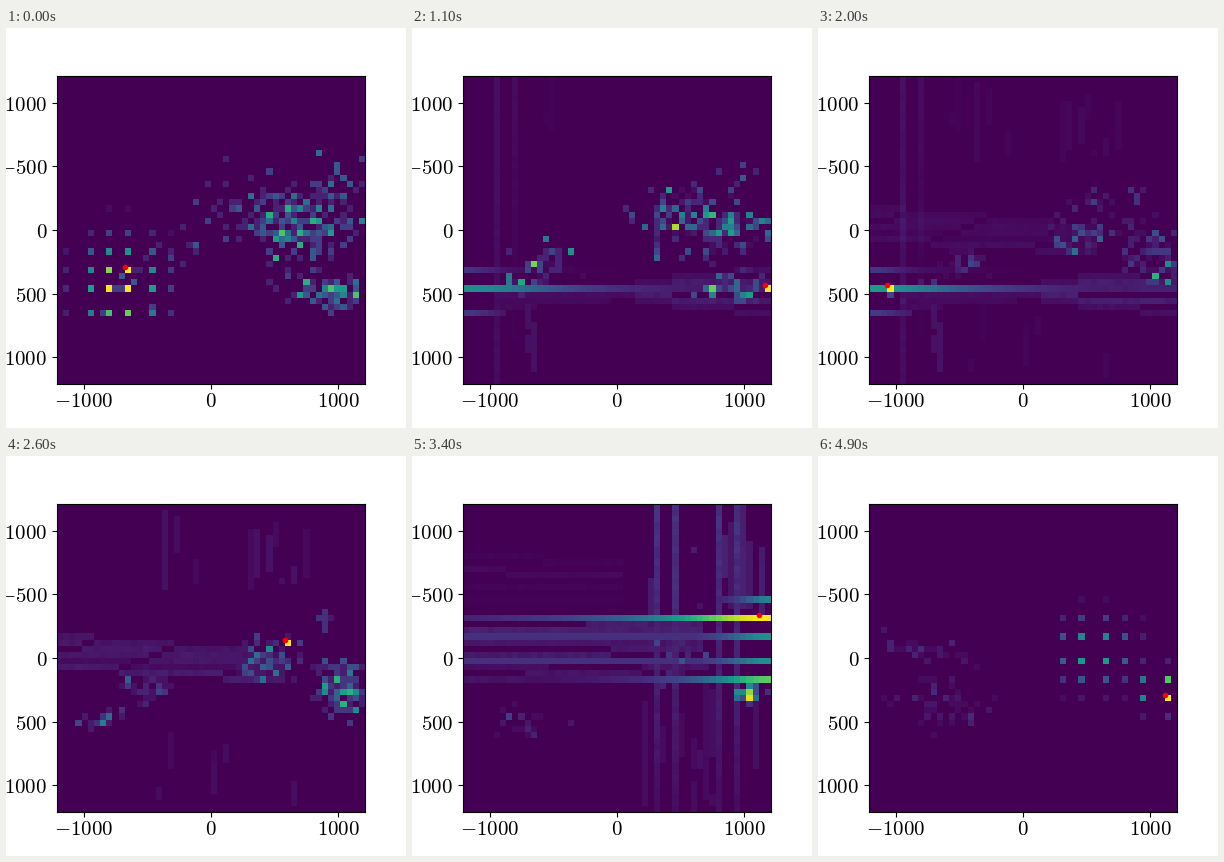
Write a matplotlib script that moves like this. It is 400 px wide and 400 px high and loops after 5 s.

```python
import numpy as np
import matplotlib.pyplot as plt
from matplotlib.animation import FuncAnimation

plt.rcParams["mathtext.fontset"] = "cm"

N = 50
HALF = 1212.5
CELL = 2 * HALF / N
FRAMES, INTERVAL = 50, 100
GRID_COLS = np.array([1, 5, 8, 11, 15, 18])
GRID_ROWS = np.array([11, 15, 18, 21, 25, 28, 31, 34, 38])


class Scene:
    """A histogram of isolated hits (cells) and smeared paths (trails)."""

    def __init__(self, seed, peak):
        self.rng = np.random.default_rng(seed)
        self.peak = peak
        self.cells = np.zeros((N, N))
        self.trails = np.zeros((N, N))

    def cloud(self, n, col, row, sc, sr, step=0.09, tilt=0.0):
        """Gaussian scatter of hits, each a small random multiple of step."""
        dc = self.rng.normal(0, sc, n)
        c = np.rint(col + dc).astype(int)
        r = np.rint(row + tilt * dc + self.rng.normal(0, sr, n)).astype(int)
        ok = (c >= 0) & (c < N) & (r >= 0) & (r < N)
        hits = np.zeros((N, N))
        np.add.at(hits, (r[ok], c[ok]), step * self.rng.geometric(0.65, ok.sum()))
        self.cells = np.maximum(self.cells, np.minimum(hits, 8 * step))
        return self

    def grid(self, cols, col, row, sc, sr, amp):
        """Lattice of hits under a Gaussian envelope."""
        rows, cols = np.meshgrid(GRID_ROWS, cols, indexing="ij")
        v = amp * np.exp(-((cols - col) / sc) ** 2 - ((rows - row) / sr) ** 2)
        v[v < 0.03] = 0
        self.cells[rows, cols] = np.maximum(self.cells[rows, cols], v)
        return self

    def beam(self, row, c0, c1, v, reach, floor=0.0):
        """Horizontal streak, brightest at c0 and falling off towards c1."""
        c = np.arange(min(c0, c1), max(c0, c1) + 1)
        fall = np.maximum(v / (1 + ((c - c0) / reach) ** 2), floor)
        self.trails[row, c] = np.maximum(self.trails[row, c], fall)
        return self

    def fan(self, n, start, end, v):
        """Faint lines between two vertical spans, each (col, top, bottom)."""
        c = np.arange(start[0], end[0] + 1)
        u = np.linspace(0, 1, len(c))
        for s in np.linspace(0, 1, n):
            r0 = start[1] + s * (start[2] - start[1])
            r1 = end[1] + s * (end[2] - end[1])
            r = np.rint(r0 + u * (r1 - r0)).astype(int)
            fall = v * self.rng.uniform(0.4, 1.2) * self.rng.uniform(0.7, 1, len(c))
            self.trails[r, c] = np.maximum(self.trails[r, c], fall)
        return self

    def rain(self, n, c0, c1, r0, r1, v):
        """Faint vertical segments at random columns."""
        for _ in range(n):
            c = self.rng.integers(c0, c1 + 1)
            top, end = np.sort(self.rng.integers(r0, r1 + 1, 2))
            part = self.trails[top:end + 1, c]
            np.maximum(part, v * self.rng.uniform(0.5, 1), out=part)
        return self

    def column(self, c, v_top, v_bottom):
        v = np.linspace(v_top, v_bottom, N) * self.rng.uniform(0.7, 1, N)
        self.trails[:, c] = np.maximum(self.trails[:, c], v)
        return self

    def done(self):
        self.cells = np.minimum(self.cells, 0.99)
        self.cells[self.peak] = 1
        return self


def left_grid():
    s = Scene(3, (31, 11))
    s.cloud(225, 38, 23, 5.5, 3.3)
    s.cloud(85, 45, 35, 3.6, 1.2, tilt=0.1)
    s.cloud(16, 44, 17, 2.5, 2, tilt=-0.7)
    s.cloud(22, 13, 31, 5, 2, tilt=-0.4)
    return s.grid(GRID_COLS, 10, 34, 6, 7, 1.1).done()


def right_arc():
    s = Scene(8, (34, 49))
    s.cloud(150, 36, 23, 4, 3, 0.11)
    s.cloud(75, 45, 24, 3.5, 2.2, 0.11)
    s.cloud(85, 45, 34, 3.2, 1.1, 0.11)
    s.cloud(14, 44, 16, 2.5, 2, tilt=-0.7)
    s.cloud(85, 12, 31, 4.5, 2.2, 0.1, tilt=-0.55)
    return s.done()


def left_beam():
    s = Scene(15, (34, 3))
    s.cloud(45, 35, 22, 2.6, 2.6, 0.035)
    s.cloud(45, 45, 28, 3, 3, 0.035)
    s.cloud(20, 14, 31, 3, 2, 0.025)
    s.beam(34, 0, 49, 0.99, 15, floor=0.12)
    s.beam(31, 0, 24, 0.3, 5).beam(38, 0, 6, 0.32, 5)
    s.fan(3, (5, 35, 37), (30, 35, 35), 0.13)
    s.fan(5, (28, 33, 36), (49, 31, 38), 0.17)
    s.column(5, 0.1, 0.07).column(8, 0.07, 0)
    s.rain(3, 10, 11, 36, 49, 0.1).rain(3, 13, 16, 0, 10, 0.03)
    return s.done()


def short_hits():
    s = Scene(26, (22, 37))
    s.cloud(65, 34, 24.5, 2.2, 2, 0.06)
    s.cloud(95, 46, 29.5, 1.9, 2.6, 0.08)
    s.cloud(10, 43, 18.5, 0.7, 1, 0.07)
    s.cloud(28, 14, 29, 2.5, 1.5, 0.05)
    s.cloud(16, 7, 34.5, 2.5, 0.8, 0.07)
    s.fan(5, (0, 21, 26), (36, 24, 28), 0.08)
    s.rain(10, 17, 42, 0, 13, 0.05).rain(6, 16, 40, 36, 49, 0.04)
    return s.done()


def right_beams():
    s = Scene(34, (18, 48))
    s.cloud(22, 9, 35, 3, 1.5, 0.03)
    s.cloud(35, 36, 23, 3, 3, 0.05)
    s.cloud(35, 46, 30, 1, 1, 0.12)
    s.beam(18, 49, 0, 0.99, 16, floor=0.07)
    s.beam(28, 49, 4, 0.75, 9, floor=0.04)
    for row in (21, 25):
        s.beam(row, 49, 0, 0.5, 7, floor=0.14)
    s.beam(15, 49, 42, 0.45, 4)
    s.fan(6, (0, 18, 28), (38, 19, 26), 0.1)
    s.fan(4, (0, 8, 15), (25, 9, 15), 0.025)
    for c in (31, 34, 41, 44):
        s.column(c, 0.17, 0.04)
    s.rain(14, 30, 48, 0, 17, 0.1).rain(14, 28, 47, 28, 49, 0.05)
    return s.done()


def converging():
    s = Scene(40, (30, 47))
    s.cloud(45, 12, 24, 6, 2, 0.04, tilt=0.15)
    s.cloud(55, 46, 29.7, 1.1, 0.7, 0.09)
    s.beam(31, 44, 15, 0.42, 22)
    s.beam(21, 47, 30, 0.32, 14).beam(24, 45, 31, 0.25, 12)
    s.cloud(12, 33.5, 25.5, 0.5, 0.6, 0.08)
    s.fan(8, (0, 20, 28), (34, 25, 29), 0.19)
    s.fan(5, (0, 32, 38), (30, 31, 33), 0.1)
    s.beam(16, 0, 9, 0.22, 6).beam(9, 8, 11, 0.1, 5).beam(9, 8, 4, 0.1, 5)
    s.rain(8, 32, 48, 0, 19, 0.07).rain(6, 25, 46, 36, 49, 0.03)
    return s.done()


def right_grid():
    s = Scene(49, (31, 48))
    s.cloud(45, 10, 32, 4, 2.6, 0.03)
    s.cloud(28, 8, 23, 4, 0.7, 0.03, tilt=0.25)
    s.grid(49 - GRID_COLS, 36, 23.5, 6, 5, 0.65)
    s.grid(49 - GRID_COLS, 47, 29.7, 3.5, 3, 1.1)
    return s.done()


KEYS = (0, 7, 15, 26, 34, 40, 49)
SCENES = [make() for make in (left_grid, right_arc, left_beam, short_hits,
                              right_beams, converging, right_grid)]
ORDER = np.random.default_rng(1).random((N, N))


def histogram(i):
    """Hits dissolve cell by cell, trails cross-fade; peak is scaled to 1."""
    k = min(int(np.searchsorted(KEYS, i, side="right")) - 1, len(KEYS) - 2)
    a, b = SCENES[k], SCENES[k + 1]
    t = (i - KEYS[k]) / (KEYS[k + 1] - KEYS[k])
    fade = t if b.trails.any() else min(1, 5 * t)
    cells = np.where(ORDER < t, b.cells, a.cells)
    total = np.maximum(cells, (1 - fade) * a.trails + fade * b.trails)
    return total / total.max()


fig, ax = plt.subplots(figsize=(4, 4), dpi=100)
image = ax.imshow(np.zeros((N, N)), vmin=0, vmax=1, cmap="viridis",
                  interpolation="nearest", extent=(-HALF, HALF, HALF, -HALF))
peak, = ax.plot([], [], "r.")
ax.set_xlim(-HALF, HALF)
ax.set_ylim(HALF, -HALF)
for axis, start, step in ((ax.xaxis, -1000, 1000), (ax.yaxis, -1000, 500)):
    ticks = range(start, 1001, step)
    axis.set_ticks(ticks, [f"${v}$" for v in ticks], fontsize=15)
ax.tick_params(axis="x", pad=1.5)


def update(i):
    data = histogram(i)
    image.set_data(data)
    row, col = np.unravel_index(data.argmax(), data.shape)
    peak.set_data([col * CELL - HALF], [row * CELL - HALF])
    return image, peak


anim = FuncAnimation(fig, update, frames=FRAMES, interval=INTERVAL,
                     repeat=True, repeat_delay=0)
plt.show()
```
